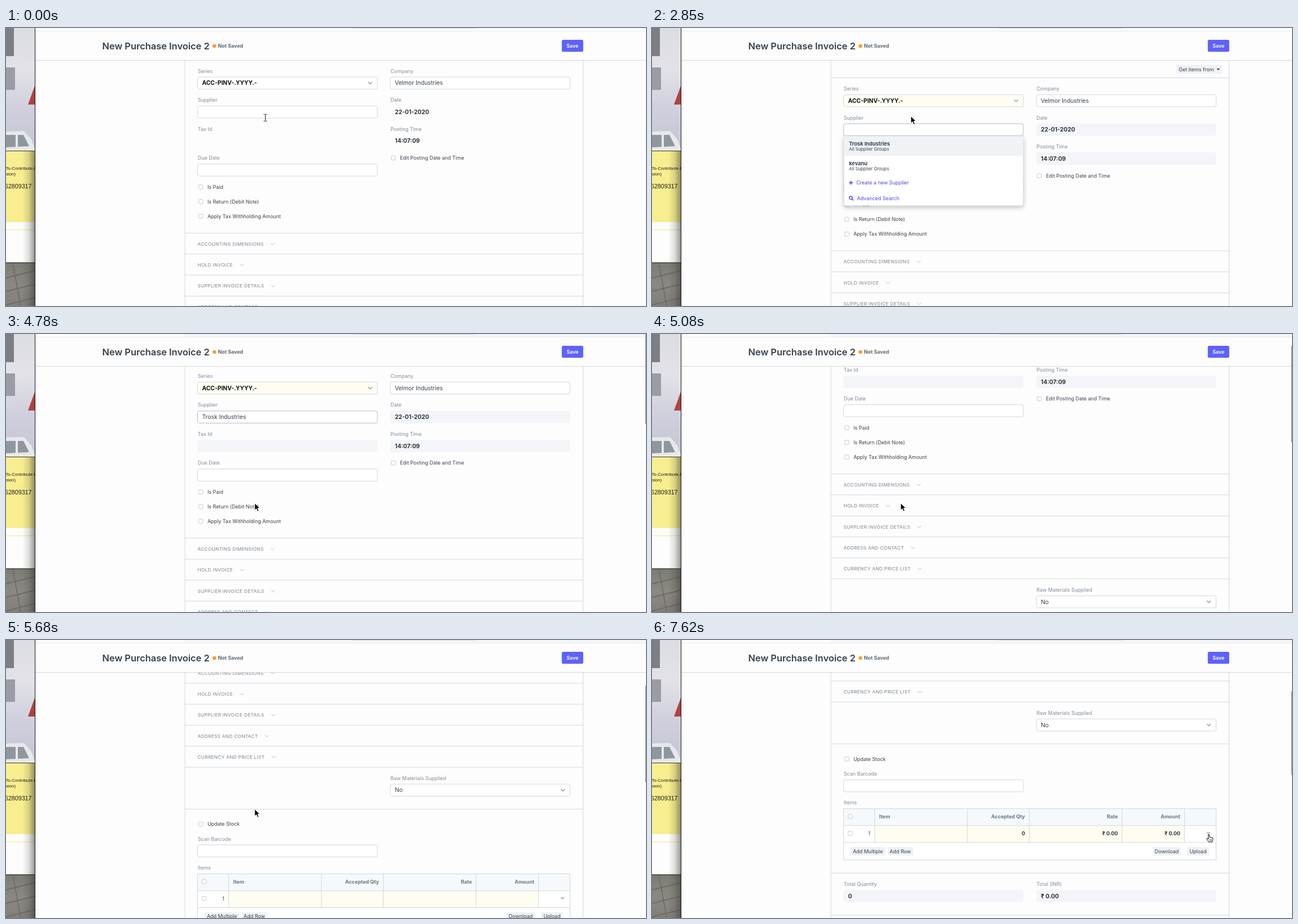
These frames come from a looping animation (1134x494 px, 8 s). An HTML page with a canvas:

```html
<!DOCTYPE html>
<html lang="en">
<head>
<meta charset="utf-8">
<title>Purchase invoice form</title>
<style>
html, body { margin: 0; width: 100%; height: 100%; overflow: hidden; background: #fdfdfd; }
canvas { display: block; width: 1134px; height: 494px; }
</style>
</head>
<body>
<canvas id="stage" width="1134" height="494"></canvas>
<script>
const g = document.getElementById('stage').getContext('2d');
const LOOP = 8000, W = 1134, H = 494;
const SANS = 'Inter, "Open Sans", sans-serif';
const ARIAL = '"Liberation Sans", Arial, sans-serif';
const PAGE = '#fdfdfd', LINE = '#d1d8dd', MUTED = '#808c99', INK = '#36414c',
      BOLD = '#2b333c', GREY = '#f4f5f9', CREAM = '#fffdf1', BLUE = '#4a45ee';
const LEFT = 339.5, RIGHT = 681, FIELD = 318.5, ROW = 51.5;

// Moments of the story, in ms
const OPEN = 2850, PICK = 3740, SCROLL = 4330, FILL = 6880, HOVER = 7620;

const spans = [[0, 0], [300, 300], [OPEN, OPEN], [3290, 4030], [SCROLL, 5080],
  [5380, 5680], [5980, 6130], [6430, 7470], [HOVER, HOVER]];

function refresh(t) {
  const [a, b] = spans.filter(s => s[0] <= t).pop();
  const step = (b - a) / Math.round((b - a) / 150) || 1;
  return Math.min(b, a + Math.floor((t - a) / step + 1e-6) * step);
}

const part = (t, a, b) => Math.min(1, Math.max(0, (t - a) / (b - a)));
const smooth = p => p * p * (3 - 2 * p);

function scrollAt(t) {
  if (t < OPEN) return 31.5;
  const flick = 1 - (1 - part(t, 5380, 6130)) ** 1.83;
  return 177.5 * smooth(part(t, 4600, 5250)) + 294.8 * flick;
}

// Pointer moves: start, end, target
const moves = [[3140, PICK, 440.7, 210], [PICK, 4030, 440.7, 300.5],
  [6280, 6580, 941.7, 337.3], [6580, 7470, 985, 343]];

function pointerAt(t) {
  let x = 458.7, y = 156.7;
  for (const [a, b, toX, toY] of moves) {
    const k = smooth(part(t, a, b));
    x += (toX - x) * k;
    y += (toY - y) * k;
  }
  return [x, y];
}

function rect(x, y, w, h, fill) {
  g.fillStyle = fill;
  g.fillRect(x, y, w, h);
}

function box(x, y, w, h, r, fill, stroke) {
  g.beginPath();
  g.roundRect(x, y, w, h, r);
  if (fill) { g.fillStyle = fill; g.fill(); }
  if (stroke) { g.strokeStyle = stroke; g.lineWidth = 1; g.stroke(); }
}

function poly(points, fill, stroke, width = 1) {
  g.beginPath();
  points.forEach(([x, y], i) => i ? g.lineTo(x, y) : g.moveTo(x, y));
  if (fill) { g.closePath(); g.fillStyle = fill; g.fill(); }
  if (stroke) { g.strokeStyle = stroke; g.lineWidth = width; g.stroke(); }
}

function disc(x, y, r, fill, stroke) {
  g.beginPath();
  g.arc(x, y, r, 0, 7);
  if (fill) { g.fillStyle = fill; g.fill(); }
  if (stroke) { g.strokeStyle = stroke; g.lineWidth = 1.4; g.stroke(); }
}

// y is the middle of the capitals; returns the width
function text(s, x, y, size = 8.95, color = INK, weight = 400, align = 'left', family = SANS) {
  g.font = `${weight} ${size}px ${family}`;
  g.textAlign = align;
  g.fillStyle = color;
  g.fillText(s, x, y + size * 0.364);
  return g.measureText(s).width;
}

const rule = (y, x = 317, w = 705) => rect(x, y - 0.5, w, 1, LINE);
const label = (s, x, y) => text(s, x + 0.3, y, 8.95, MUTED);
const chevron = (x, y, r, color, w) =>
  poly([[x - r, y - r / 2], [x, y + r / 2], [x + r, y - r / 2]], null, color, w);
const caret = (x, y, r, color) => poly([[x - r, y - r / 2], [x + r, y - r / 2], [x, y + r / 2]], color);

function input(name, x, y, value = '', o = {}) {
  label(name, x, y);
  const top = y + 10.6, weight = o.readOnly ? 700 : 400;
  if (!o.readOnly) box(x, top, FIELD, 21.5, 3, o.fill || '#fff', o.border || LINE);
  else if (o.fill) box(x, top - 0.5, FIELD, 22, 3, o.fill);
  text(value, x + 8, top + 10.6, 10.3, o.color || (o.readOnly ? BOLD : INK), o.weight || weight);
  if (o.select) chevron(x + 305.7, top + 10.6, 3.5, '#7d8894', 1.2);
}

function check(s, x, y) {
  box(x + 2, y - 3.8, 7.5, 7.5, 1.5, '#fff', '#c3c9cf');
  text(s, x + 17.4, y);
}

function button(s, x, y, w) {
  box(x, y - 7.5, w, 15, 2, '#eff1f5');
  text(s, x + w / 2, y, 8.95, INK, 400, 'center');
}

function section(s, y) {
  g.letterSpacing = '0.35px';
  const w = text(s, LEFT, y, 8.2, '#76828e');
  g.letterSpacing = '0px';
  chevron(LEFT + w + 16, y, 3.5, '#b3bdc7', 1);
}

function table(top, filled) {
  const cols = [339.5, 394.5, 559, 668.5, 833, 943.5, 999.5];
  const mid = top + 30, low = top + 60, end = top + 91;
  const head = top + 14, row = mid + 14, foot = low + 15.7;
  rect(LEFT, top, 660, 30, '#f5f9fc');
  rect(LEFT, mid, 660, 61, '#fff');
  rect(cols[1], mid, cols[5] - cols[1], 30, CREAM);
  cols.forEach((x, i) => rect(x - 0.5, top, 1, (i % 6 ? low : end) - top, LINE));
  for (const y of [top, mid, low, end]) rule(y, 339, 661);
  check('', 345.5, head);
  check('', 345.5, row);
  text('1', 387, row, 8.95, INK, 400, 'right');
  text('Item', 402.5, head, 8.95, '#6c7680', 700);
  ['Accepted Qty', 'Rate', 'Amount'].forEach((s, i) => {
    const x = cols[i + 3] - 7.5;
    text(s, x, head, 8.95, '#6c7680', 700, 'right');
    if (filled) text(i ? '₹ 0.00' : '0', x, row, 8.95, BOLD, 700, 'right');
  });
  caret(986, row, 4.3, '#b8c0c8');
  button('Add Multiple', 351.5, foot, 62);
  button('Add Row', 417.5, foot, 45);
  button('Download', 887, foot, 50);
  button('Upload', 948, foot, 39);
}

function dropdown() {
  g.save();
  g.shadowColor = 'rgba(0,0,0,.24)';
  g.shadowBlur = 8;
  g.shadowOffsetY = 3;
  box(340, 192, 318, 124, 3, '#fff');
  g.restore();
  box(340, 192, 318, 124, [0, 0, 3, 3], '#fff', LINE);
  rect(340.5, 192, 317, 35, '#f0f2f6');
  ['Trosk Industries', 'kevanu'].forEach((s, i) => {
    text(s, 349, 206 + 35 * i, 9.2, INK, 700);
    text('All Supplier Groups', 349, 215.2 + 35 * i, 7.83);
  });
  rect(349, 274.2, 7, 1.6, BLUE);
  rect(351.7, 271.5, 1.6, 7, BLUE);
  text('Create a new Supplier', 362, 275, 8.95, BLUE);
  disc(352.3, 301.8, 2.6, null, BLUE);
  poly([[354.2, 303.8], [356.8, 306.4]], null, BLUE, 1.6);
  text('Advanced Search', 363.3, 302.3, 8.95, BLUE);
}

function form(t) {
  const begun = t >= OPEN, chosen = t >= PICK, filled = t >= FILL;
  const readOnly = { readOnly: true, fill: begun && GREY };

  if (begun) {
    button('', 929, 73.3, 81);
    text('Get items from', 933.3, 73.3);
    caret(1003.3, 73.5, 2.9, INK);
    rule(88.5);
  }
  const y = 108;
  input('Series', LEFT, y, 'ACC-PINV-.YYYY.-',
    { select: true, weight: 700, color: '#111', fill: begun && CREAM });
  input('Company', RIGHT, y, 'Velmor Industries');
  input('Supplier', LEFT, y + ROW, chosen ? 'Trosk Industries' : '', { border: begun && '#b4bbc3' });
  input('Date', RIGHT, y + ROW, '22-01-2020', readOnly);
  input('Tax Id', LEFT, y + 2 * ROW, '', readOnly);
  input('Posting Time', RIGHT, y + 2 * ROW, '14:07:09', readOnly);
  input('Due Date', LEFT, y + 3 * ROW);
  check('Edit Posting Date and Time', 680.5, y + 3 * ROW);
  ['Is Paid', 'Is Return (Debit Note)', 'Apply Tax Withholding Amount']
    .forEach((s, i) => check(s, LEFT, 314 + 26.1 * i));

  ['ACCOUNTING DIMENSIONS', 'HOLD INVOICE', 'SUPPLIER INVOICE DETAILS',
    'ADDRESS AND CONTACT', 'CURRENCY AND PRICE LIST'].forEach((s, i) => {
    rule(396 + 37.3 * i);
    section(s, 415.4 + 37.3 * i);
  });
  rule(582.5);
  input('Raw Materials Supplied', RIGHT, 602, 'No', { select: true });
  rule(657);
  check('Update Stock', LEFT, 683.7);
  input('Scan Barcode', LEFT, 710);
  label('Items', LEFT, 761);
  table(772, filled);
  rule(886.5);
  if (filled) {
    input('Total Quantity', LEFT, 906, '0', readOnly);
    input('Total (INR)', RIGHT, 906, '₹ 0.00', readOnly);
  } else {
    input('Tax Category', LEFT, 906);
    input('Shipping Rule', RIGHT, 906);
  }
  rule(961.5);
  if (begun && !chosen) dropdown();
}

function header(scrolled) {
  rect(52, 0, W - 52, 57, PAGE);
  if (scrolled) rect(317, 0, W - 317, 5, '#f5f6fa');
  rect(52, 5, W - 52, 1, '#e6e9ed');
  box(612.5, -18, 222.5, 18.7, 3, '#fff', '#d5d9dd');
  rule(57.5, 52, W - 52);
  text('New Purchase Invoice 2', 170.5, 32, 16.43, INK, 600);
  disc(369.3, 32, 3.3, '#f99d32');
  text('Not Saved', 375.5, 32, 8.95, '#5f6b77', 700);
  box(984.8, 20.9, 38, 21.3, 2.5, '#5e62f8');
  text('Save', 1003.8, 31.8, 8.95, '#fff', 600, 'center');
}

function shade(x, y, w, h, stops, down) {
  const q = down ? g.createLinearGradient(0, y, 0, y + h) : g.createLinearGradient(x, 0, x + w, 0);
  stops.forEach((c, i) => q.addColorStop(i / (stops.length - 1), c));
  rect(x, y, w, h, q);
}

// Slice of a desktop picture and a yellow note beside the window
function backdrop() {
  g.save();
  g.beginPath();
  g.rect(0, 0, 52, H);
  g.clip();
  shade(0, 0, 52, 218, ['#dcdde1', '#e2e2e8', '#cfcfdd', '#c4c5d4'], true);
  rect(0, 0, 14, 50, '#7b7f85');
  rect(0, 70, 16, 40, '#9b9da6');
  poly([[52, 100], [39, 136], [52, 136]], '#b0413f');
  poly([[0, 184], [32, 183], [45, 198], [52, 218], [0, 218]], '#e6e8ec');
  poly([[0, 190], [31, 190], [41, 210], [0, 212]], '#8f979d');
  rect(17, 188, 4, 25, '#e6e8ec');

  rect(0, 218, 52, 1, '#3b3929');
  rect(0, 219, 52, 126, '#f8ee90');
  rect(0, 345, 52, 72, '#fdfdfd');
  rect(0, 358, 52, 1, '#f3e77f');
  shade(0, 417, 52, 77, ['#7b7c73', '#8b8783', '#827e7a'], true);
  for (let y = 438; y < 500; y += 24) poly([[0, y + 6], [52, y - 7]], null, '#66675c', 1.3);
  poly([[12, 417], [26, 494]], null, '#66675c', 1.3);
  rect(0, 416.5, 52, 1.2, '#222');
  shade(29, 219, 23, 275, ['rgba(50,50,40,0)', 'rgba(50,50,40,.16)', 'rgba(50,50,40,.55)']);

  const ink = '#1f1e16';
  text('To-Contribute-I', -0.6, 249, 7.9, ink, 400, 'left', ARIAL);
  text('sion)', 0, 259, 7.9, ink, 400, 'left', ARIAL);
  text('62809317', 45.5, 281, 10.7, ink, 400, 'right', ARIAL);
  rect(51, 0, 1.2, H, '#15151a');
  g.restore();
}

function arrow(x, y) {
  g.save();
  g.translate(x, y);
  poly([[0, 0], [0, 12.6], [2.9, 9.9], [5, 14.8], [7.3, 13.8], [5.2, 9], [9.2, 9], [0, 0]], '#000', '#fff');
  g.restore();
}

function beam(x, y) {
  for (const s of [-1, 1])
    poly([[x + 3 * s, y - 6.3], [x + s, y - 6.3], [x, y - 5.3], [x, y + 5.3],
      [x + s, y + 6.3], [x + 3 * s, y + 6.3]], null, '#222');
}

function hand(x, y) {
  g.save();
  g.translate(x, y);
  g.lineJoin = 'round';
  poly([[0, 0.4], [2, 0.4], [2.4, 4.6], [8.3, 6], [8.3, 9], [7, 13.4], [1, 13.4],
    [-2.8, 7.8], [-2, 6.7], [0.5, 8], [0, 0.4]], '#fff', '#111');
  for (const dx of [2.4, 4.2, 6]) poly([[dx, 8.6], [dx, 11.4]], null, '#111', 0.7);
  g.restore();
}

function draw(time) {
  const t = refresh(time), scroll = scrollAt(t), scrolled = t >= SCROLL;

  rect(0, 0, W, H, PAGE);
  g.save();
  g.beginPath();
  g.rect(52, 58, W - 52, H - 58);
  g.clip();
  rect(316.5, 58, 1, H, LINE);
  rect(1022, 58, 1, H, LINE);
  g.translate(0, -scroll);
  form(t);
  g.restore();
  header(scrolled);
  backdrop();

  if (scrolled) {
    // The thumb shrinks once the form has grown
    const [ratio, size] = t < FILL ? [0.287, 171] : [0.237, 149];
    rect(1133, ratio * scroll - 21, 1, size, '#6f7176');
  }
  if (t >= 300 && t < OPEN) rect(348, 143, 1, 12, '#222');
  if (t < OPEN) beam(459.5, 159.5);
  else if (t < HOVER) arrow(...pointerAt(t));
  else hand(985.5, 345.5);
}

function loop() {
  draw(performance.now() % LOOP);
  requestAnimationFrame(loop);
}
loop();
</script>
</body>
</html>
```
